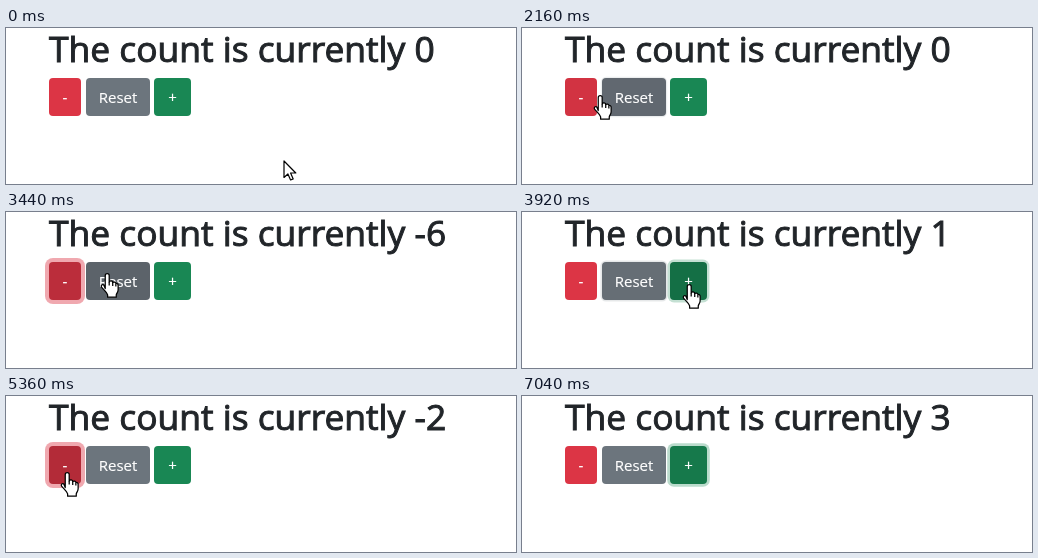
Recreate the animation shown at these times as an HTML page. Size 510 by 156 pixels, loop 7080 ms.

```html
<!DOCTYPE html>
<html lang="en">
<head>
<meta charset="utf-8">
<title>Counter</title>
<style>
html, body { margin: 0; width: 100%; height: 100%; overflow: hidden; background: #fff; }
svg { display: block; width: 510px; height: 156px; font-family: "Open Sans", "Noto Sans", sans-serif; }
#heading { font-size: 35.4px; fill: #212529; stroke: #212529; stroke-width: 1; }
.label { font-size: 15px; fill: #fff; stroke: #fff; stroke-width: .2; text-anchor: middle; }
.cursor { fill: #fff; stroke: #000; stroke-width: 1.2; stroke-linejoin: round; }
</style>
</head>
<body>
<svg viewBox="0 0 510 156">
  <text id="heading" x="43" y="34"></text>
  <g id="buttons"></g>
  <path id="arrow" class="cursor" d="M0 0V16.5L3.9 13L6.6 19L9.2 17.9L6.6 12H11.8Z"/>
  <g id="hand" class="cursor">
    <g transform="translate(-1.2 0) scale(1.04)">
      <path d="M-1.5 15V2.4a1.9 1.9 0 0 1 3.8 0V8.6a1.8 1.8 0 0 1 3.4.6 1.8 1.8 0 0 1 3 .8 1.7 1.7 0 0 1 2.2 1.7V16c0 2.5-1.5 3.5-1.8 5V23.3H.8V21C0 18.5-3 16-5 13.6c-1-1.5.5-3 2-2.2z"/>
      <path fill="none" d="M2.3 8.6V12M5.7 9.4V12.4M8.7 10.4V13"/>
    </g>
  </g>
</svg>
<script>
const LOOP = 7080, STEP = 40, FADE = 150, RING = 4;
const byId = id => document.getElementById(id);

const buttons = {
  minus: { label: "-", x: 43, w: 32, from: 40, to: 80, delta: -1,
           base: [220, 53, 69], hover: [187, 45, 59], active: [176, 42, 55], ring: "225,83,97" },
  reset: { label: "Reset", x: 80, w: 64, from: 80, to: 146, delta: 0,
           base: [108, 117, 125], hover: [92, 99, 106], active: [86, 94, 100], ring: "130,138,145" },
  plus:  { label: "+", x: 148, w: 37, from: 146, to: 188, delta: 1,
           base: [25, 135, 84], hover: [21, 115, 71], active: [20, 108, 67], ring: "60,153,110" }
};

// Runs of clicks: button, first time, interval, number of clicks
const clicks = [
  ["plus", 400, 160, 5], ["reset", 1740, 0, 1],
  ["minus", 2280, 160, 6], ["reset", 3560, 0, 1],
  ["plus", 3840, 130, 4], ["minus", 4600, 140, 7],
  ["plus", 5680, 144, 6]
].flatMap(([name, start, gap, n]) =>
  Array.from({ length: n }, (_, i) => ({ name, t: start + i * gap })));

const blurs = [2060, 7000];

// Pointer tip: time, x, y
const path = [
  [0, 278, 133], [60, 278, 133], [360, 178, 78], [1280, 178, 78],
  [1440, 166, 86], [1540, 150, 86], [1680, 118, 70], [1880, 118, 68],
  [2140, 79, 67], [2160, 79, 67], [2260, 62, 68], [3200, 62, 68],
  [3400, 102, 61], [3600, 102, 62], [3780, 168, 72], [4240, 168, 74],
  [4480, 70, 74], [5460, 62, 76], [5640, 168, 66], [6160, 170, 57],
  [6500, 170, 60], [6960, 278, 160], [LOOP, 278, 160]
];

function pointer(t) {
  const i = Math.max(1, path.findIndex(p => p[0] > t));
  const [t0, x0, y0] = path[i - 1], [t1, x1, y1] = path[i];
  const u = (t - t0) / (t1 - t0), k = u * u * (3 - 2 * u);
  return [x0 + (x1 - x0) * k, y0 + (y1 - y0) * k];
}

function hovered(t) {
  const [x, y] = pointer(t);
  if (y < 48 || y > 90) return;
  return Object.keys(buttons).find(n => x >= buttons[n].from && x < buttons[n].to);
}

const lastClick = t => clicks.filter(c => c.t <= t).pop();

function focused(t) {
  const c = lastClick(t);
  return c && !blurs.some(b => b > c.t && b <= t) ? c.name : undefined;
}

function targetColor(name, t) {
  const b = buttons[name], c = lastClick(t), over = hovered(t) === name;
  if (over && c && c.name === name && t - c.t < 90) return b.active;
  return over || focused(t) === name ? b.hover : b.base;
}

// Averaging over the recent past gives a transition of length FADE
function faded(t, value) {
  const n = 10;
  let sum = 0;
  for (let i = 0; i < n; i++) sum += value(Math.max(0, t - FADE * i / n));
  return sum / n;
}

const countAt = t => clicks.reduce((n, c) =>
  c.t > t ? n : c.name === "reset" ? 0 : n + buttons[c.name].delta, 0);

function set(el, attrs) {
  for (const key in attrs) el.setAttribute(key, attrs[key]);
}

function add(tag, attrs, text = "") {
  const el = document.createElementNS("http://www.w3.org/2000/svg", tag);
  set(el, attrs);
  el.textContent = text;
  return byId("buttons").appendChild(el);
}

const box = (b, spread) => ({
  x: b.x - spread, y: 50 - spread, width: b.w + 2 * spread, height: 38 + 2 * spread, rx: 4 + spread
});

for (const b of Object.values(buttons)) {
  b.halo = add("rect", { fill: `rgba(${b.ring},.5)` });
  b.face = add("rect", box(b, 0));
  add("text", { class: "label", x: b.x + b.w / 2, y: 75 }, b.label);
}

function draw(t) {
  byId("heading").textContent = `The count is currently ${countAt(t)}`;
  for (const [name, b] of Object.entries(buttons)) {
    const rgb = b.base.map((_, i) => Math.round(faded(t, s => targetColor(name, s)[i])));
    const glow = faded(t, s => +(focused(s) === name));
    set(b.face, { fill: `rgb(${rgb})` });
    set(b.halo, { ...box(b, RING * glow), opacity: glow });
  }
  const over = hovered(t), at = `translate(${pointer(t).map(Math.round)})`;
  for (const [id, shown] of [["hand", over], ["arrow", !over]])
    set(byId(id), { transform: at, visibility: shown ? "visible" : "hidden" });
}

const start = performance.now();
function tick() {
  const t = (performance.now() - start) % LOOP;
  draw(Math.floor(t / STEP) * STEP);
  requestAnimationFrame(tick);
}
tick();
</script>
</body>
</html>
```
